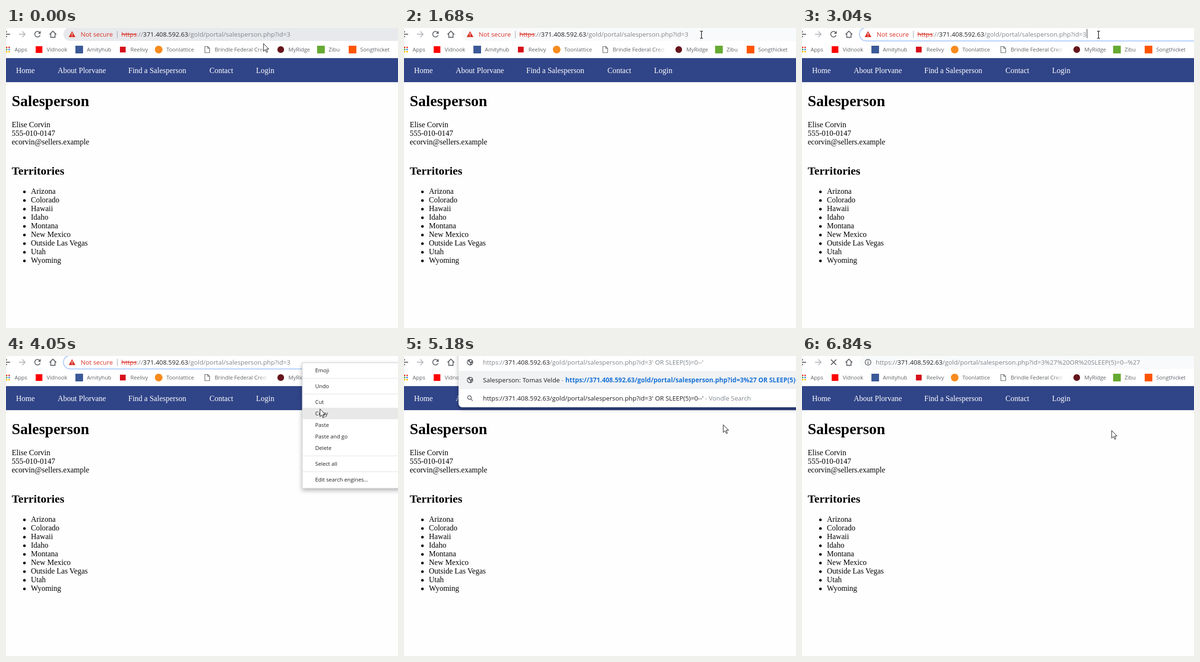
Write an HTML page that moves like this. It is 819 by 626 pixels and loops after 8 s.

```html
<!DOCTYPE html>
<html lang="en">
<head>
<meta charset="utf-8">
<title>Salesperson</title>
<style>
html, body { margin: 0; width: 819px; height: 626px; overflow: hidden; background: #fefefe; }
svg { display: block; }
text { white-space: pre; }
.ui { font: 13.3px "Open Sans", "Noto Sans", sans-serif; fill: #202124; }
.small { font-size: 11.3px; fill: #5f6368; }
.grey { fill: #80868b; }
.dark { fill: #202124; }
.red { fill: #d93025; }
.link { fill: #1a73d8; font-weight: bold; }
.page { font: 16px "Liberation Serif", "Times New Roman", serif; fill: #000; }
.page .h1 { font-size: 32px; font-weight: bold; }
.page .h2 { font-size: 24px; font-weight: bold; }
.line { fill: none; stroke: #5f6368; stroke-width: 1.8; }
#selection text, #selection tspan { fill: #fff; }
</style>
</head>
<body>
<svg width="819" height="626" viewBox="0 0 819 626">
  <defs>
    <linearGradient id="fade"><stop stop-color="#fff" stop-opacity="0"/><stop offset="1" stop-color="#fff"/></linearGradient>
    <filter id="shadow" x="-10%" y="-20%" width="120%" height="150%">
      <feDropShadow dx="0" dy="4" stdDeviation="5" flood-opacity=".3"/>
    </filter>
    <g id="globe">
      <circle r="6.6" fill="#5f6368"/>
      <path d="M-5-2.5 0 1 1 2.500-1 5C-4 4-5.500 1-5-2.500ZM0-5 4-3.500 2-1-1-1.500ZM3 1 5 2 3 4Z" fill="#fff"/>
    </g>
  </defs>

  <g id="page" class="page"></g>

  <rect width="819" height="62" fill="#fff"/>
  <path d="M0 62.500H819" stroke="#d5d8df"/>
  <g id="bookmarks" class="ui"></g>

  <path class="line" d="M8.500 13H-4M2 7-4 13 2 19"/>
  <path class="line" style="stroke:#b9bcc0" d="M27 13H40M34 7 40 13 34 19"/>
  <g id="reload">
    <path class="line" d="M71.300 15A5.800 5.800 0 1 1 70 8.800"/>
    <path d="M72.500 6V12H66.500Z" fill="#5f6368"/>
  </g>
  <path id="stop" class="line" d="M60.500 7.500 71.500 18.500M71.500 7.500 60.500 18.500"/>
  <path class="line" d="M91 13.500 98 6.500 105 13.500M93.500 12V19.500H102.500V12"/>

  <rect id="omnibox" x="120" y="-1" width="740" height="28" rx="14"/>
  <g id="visited" class="ui">
    <path d="M138 6.500 145 19H131Z" fill="#d93025"/>
    <path d="M138 10.500V14.500M138 16V17.500" stroke="#fff" stroke-width="1.500"/>
    <text class="red" x="156" y="18">Not secure</text>
    <path d="M232.500 6V21" stroke="#9aa0a6"/>
  </g>
  <g id="selection" class="ui"><rect x="241" y="2" width="354" height="21" fill="#0078d7"/></g>

  <g id="dropdown" class="ui">
    <g id="panel">
      <rect x="114" y="-20" width="760" height="127" rx="8" fill="#fff" filter="url(#shadow)"/>
      <rect x="114" y="31" width="705" height="38" fill="#f1f2f3"/>
    </g>
    <use href="#globe" x="138" y="13"/>
    <use href="#globe" x="138" y="50"/>
    <path class="line" style="stroke-width:1.600" d="M139.500 89.500 143.500 93.500"/>
    <circle class="line" style="stroke-width:1.600" cx="136.800" cy="86.800" r="3.800"/>
    <text x="165" y="55">Salesperson: Tomas Velde<tspan class="grey"> -</tspan></text>
  </g>
  <g id="loading" class="ui">
    <circle class="line" style="stroke-width:1.500" cx="138" cy="13" r="6"/>
    <path d="M138 9.300V11M138 12V17" stroke="#5f6368" stroke-width="1.600"/>
  </g>
  <path id="caret" stroke="#202124"/>
  <g id="menu" class="ui">
    <rect x="619" y="14" width="230" height="262" fill="#fff" stroke="#c8cacd" filter="url(#shadow)"/>
    <rect id="hover" x="620" width="220" height="24" fill="#e8e8e9"/>
  </g>
  <path id="arrow" d="M.5.500V16.500L4.200 13 6.800 18.800 9.200 17.800 6.700 12H11.700Z" fill="#fff" stroke="#000"/>
  <path id="beam" d="M-3-7.500H-1L0-6.500 1-7.500H3M0-6.500V6.500M-3 7.500H-1L0 6.500 1 7.500H3" fill="none" stroke="#000" stroke-width="1.200"/>
</svg>

<script>
const $ = id => document.getElementById(id);
const add = (id, html) => $(id).insertAdjacentHTML('beforeend', html);
const text = (x, y, s, cls = '') => `<text class="${cls}" x="${x}" y="${y}">${s}</text>`;
const square = (x, y, size, fill) => `<rect x="${x}" y="${y}" width="${size}" height="${size}" fill="${fill}"/>`;
const dot = (x, y, r, fill) => `<circle cx="${x}" cy="${y}" r="${r}" fill="${fill}"/>`;

// Web page
const nav = [[21, 'Home'], [108, 'About Plorvane'], [255.5, 'Find a Salesperson'], [425, 'Contact'], [522.5, 'Login']];
const states = ['Arizona', 'Colorado', 'Hawaii', 'Idaho', 'Montana', 'New Mexico', 'Outside Las Vegas', 'Utah', 'Wyoming'];
add('page', '<rect y="63" width="819" height="50" fill="#304488"/>' +
  '<g fill="#fff">' + nav.map(([x, s]) => text(x, 94, s)).join('') + '</g>' +
  text(12, 163, 'Salesperson', 'h1') +
  ['Elise Corvin', '555-010-0147', 'ecorvin@sellers.example'].map((s, i) => text(12, 207 + 18 * i, s)).join('') +
  text(12, 306, 'Territories', 'h2') +
  states.map((s, i) => dot(38.5, 342 + 18 * i, 2.7, '#000') + text(52, 346 + 18 * i, s)).join(''));

// Bookmarks bar
const labels = [[18, 'Apps'], [85, 'Vidnook'], [169, 'Amityhub'], [260, 'Reelivy'], [335, 'Toonlattice'],
  [436, 'Brindle Federal Credit'], [590, 'MyRidge'], [674, 'Zibu'], [740, 'Songthicket']];
const apps = ['#ea4335', '#ea4335', '#34a853', '#4285f4', '#fbbc05', '#fbbc05'];
add('bookmarks', apps.map((c, i) => square(i % 2 * 5, 39 + 4.5 * (i >> 1), 3, c)).join('') +
  square(62, 38, 14, '#f00') + square(145, 37, 16, '#3b5998') + square(238, 39, 12, '#d5101a') +
  dot(319, 45, 8, '#f78b1e') + dot(574, 45, 7, '#65151c') +
  square(650, 37, 16, '#6a3') + square(716, 37, 16, '#f50') +
  '<path class="line" style="stroke-width:1.200" d="M415.500 38.500H421.500L425.500 42.500V51.500H415.500ZM421.500 38.500V42.500H425.500"/>' +
  labels.map(([x, s]) => text(x, 49, s, 'small')).join('') +
  '<rect x="526" y="36" width="21" height="18" fill="url(#fade)"/><rect x="547" y="36" width="16" height="18" fill="#fff"/>');

// Address bar
const host = '371.408.592.63', path = '/gold/portal/salesperson.php?id=3', typed = "' OR SLEEP(5)=0--'";
const rest = tail => `<tspan class="dark">${host}</tspan>${path}${tail}`;
add('visited', text(241, 18, `<tspan class="red" text-decoration="line-through">https</tspan>://` + rest(''), 'grey'));
add('selection', text(241, 18, 'https://' + rest('')));
add('dropdown', text(165, 18, 'https://' + rest(typed), 'grey') +
  text(337, 55, `https://${host}${path}%27 OR SLEEP(5)=0--%27`, 'link') +
  text(165, 93, `https://${host}${path}${typed}<tspan class="grey"> - Vondle Search</tspan>`));
add('loading', text(154, 18, 'https://' + rest('%27%20OR%20SLEEP(5)=0--%27'), 'grey'));

// Context menu: row tops and labels
const items = [[18, 'Emoji'], [51, 'Undo'], [84, 'Cut'], [108, 'Copy'], [132, 'Paste'],
  [156, 'Paste and go'], [180, 'Delete'], [213, 'Select all'], [246, 'Edit search engines...']];
add('menu', items.map(([y, s]) => text(646, y + 16, s, 'small dark')).join('') +
  [46, 79, 208, 241].map(y => `<path d="M620 ${y}.500H819" stroke="#e0e1e3"/>`).join(''));

// Pointer: time, x, y, shape
const pointer = [
  [0, 537, 32, 'arrow'], [120, 550, 51, 'arrow'], [270, 612, 31, 'arrow'], [420, 606, 31, 'arrow'],
  [570, 585, 30, 'arrow'], [690, 563, 31, 'arrow'], [840, 634, 24, 'beam'], [990, 587, 20, 'beam'],
  [1140, 578, 30, 'arrow'], [1290, 579, 24, 'arrow'], [1440, 600, 30, 'arrow'], [1560, 640, 20, 'beam'],
  [1680, 621, 14, 'beam'], [1830, 619, 14, 'beam'], [3780, 617, 14, 'arrow'], [3930, 628, 52, 'arrow'],
  [4050, 655, 110, 'arrow'], [4170, 672, 137, 'arrow'], [5180, 666, 143, 'arrow'], [5300, 654, 151, 'arrow'],
  [5420, 646, 155, 'arrow']];
const caretOn = [[2360, 2480], [3040, 3500], [4450, 5030], [5420, 6000], [6570, 6720]];
const show = (id, on) => $(id).style.display = on ? '' : 'none';

function draw(t) {
  const within = (a, b) => t >= a && t < b;
  const focused = within(2360, 4450), loading = t >= 6720;

  const box = $('omnibox');
  box.setAttribute('fill', focused ? '#fff' : t < 120 ? '#e7e9ec' : '#f9fafb');
  box.setAttribute('stroke', focused ? '#aecbfa' : 'none');
  box.setAttribute('stroke-width', 2);

  show('visited', t < 4450);
  show('selection', within(2480, 3040));
  show('dropdown', within(4450, 6720));
  $('panel').style.opacity = t < 4600 ? .88 : 1;
  show('loading', loading);
  show('stop', loading);
  show('reload', !loading);

  show('caret', caretOn.some(([a, b]) => within(a, b)));
  $('caret').setAttribute('d', `M${t < 4450 ? 595.5 : 632.5} 2V21`);

  const [, x, y, shape] = pointer.findLast(p => p[0] <= t);
  for (const id of ['arrow', 'beam']) show(id, id === shape);
  $(shape).setAttribute('transform', `translate(${x + .5} ${y})`);

  show('menu', within(3500, 4450));
  $('menu').style.opacity = t < 3630 ? .6 : 1;
  const row = items.find(([top]) => y >= top && y < top + 24);
  show('hover', row);
  if (row) $('hover').setAttribute('y', row[0]);
}

function tick() {
  draw(performance.now() % 8000);
  requestAnimationFrame(tick);
}
tick();
</script>
</body>
</html>
```
